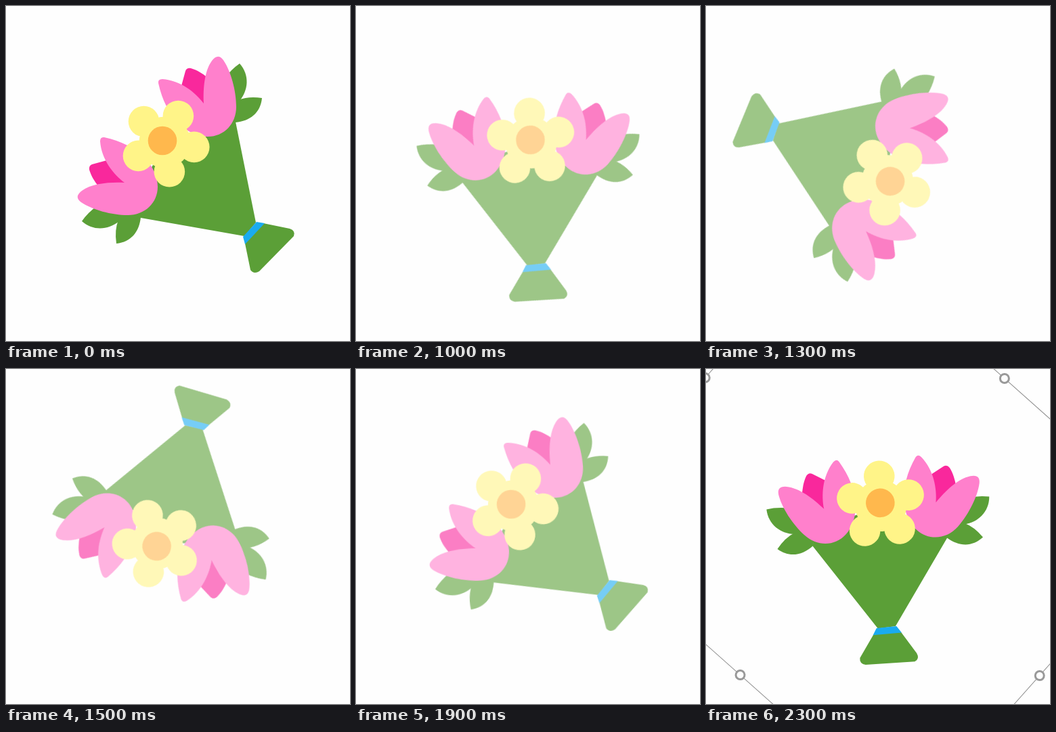
Recreate the animation shown at these times as an HTML page. Size 508 px wide and 495 px high, loop 2900 ms.

```html
<!DOCTYPE html>
<html lang="en">
<head>
<meta charset="utf-8">
<title>Rotating bouquet</title>
<style>
  html, body { margin: 0; width: 100%; height: 100%; overflow: hidden; background: #fefefe; }
  svg { display: block; width: 100%; height: 100%; }
</style>
</head>
<body>
<svg viewBox="0 0 508 495">
  <defs>
    <g id="leaves" fill="#5b9f37">
      <path d="M345 85C360 102 358 124 345 140L322 150L322 108Q332 94 345 85Z"/>
      <path d="M343 139Q358 133 378 136C376 158 360 170 339 172L318 158L322 140Z"/>
    </g>
    <g id="tulip">
      <path fill="#f9289c" d="M259 118L265 96Q267 91 273 92C283 95 290 100 297 105L293 147Z"/>
      <path fill="#ff80cc" d="M225 114Q224 108 231 108C258 110 280 128 292 144C291 122 293 96 304 81Q313 69 321 80C332 96 340 125 340 149C340 174 322 193 298 193C268 193 236 165 225 114Z"/>
    </g>
  </defs>
  <g id="bouquet">
    <use href="#leaves"/>
    <use href="#leaves" transform="matrix(0 1 1 0 27 -27)"/>
    <path fill="#5b9f37" d="M339 171L369 320L352 340L199 313L184 290L220 230L300 190L318 156Z"/>
    <path fill="#5b9f37" d="M380 321L419 329Q428 332 425 340L374 392Q366 397 361 390L353 351Z"/>
    <path fill="#1aabf0" d="M370 319L382 321L353 352L350 341Z"/>
    <use href="#tulip"/>
    <use href="#tulip" transform="matrix(0 1 1 0 31 -31)"/>
    <g id="petals" fill="#fff488">
      <circle cx="234.5" cy="201.5" r="38"/>
    </g>
    <circle cx="231" cy="199" r="21.3" fill="#ffb84d"/>
  </g>
  <g id="frame" fill="none" stroke="#8e8e8e"></g>
</svg>
<script>
const NS = 'http://www.w3.org/2000/svg';
const CENTER = [245.7, 233];
const HALF = [330.8, 293.4];
const LOOP = 2900, GRAB = 900, DROP = 2300, STEP = 100;
// Rotation in degrees for each 100 ms step of the drag
const ANGLES = [0, 42, 90, 125, 158, 200, 242, 272, 302, 330, 356.8, 375, 390, 400, 401.7];

const bouquet = document.getElementById('bouquet');
const petals = document.getElementById('petals');
const frame = document.getElementById('frame');

function add(parent, tag, attrs) {
  const el = document.createElementNS(NS, tag);
  for (const key in attrs) el.setAttribute(key, attrs[key]);
  parent.append(el);
}

for (let i = 0; i < 5; i++) {
  const a = (9 + 72 * i) * Math.PI / 180;
  add(petals, 'circle', { cx: 234.5 + 43.8 * Math.cos(a), cy: 201.5 + 43.8 * Math.sin(a), r: 22.8 });
}

const [cx, cy] = CENTER, [hw, hh] = HALF;
add(frame, 'rect', { x: cx - hw, y: cy - hh, width: 2 * hw, height: 2 * hh, 'stroke-width': 1 });
for (const [dx, dy] of [[0, -hh], [hw, 0], [0, hh], [-hw, 0]]) {
  add(frame, 'circle', { cx: cx + dx, cy: cy + dy, r: 6.5, fill: '#fefefe', stroke: '#999', 'stroke-width': 3 });
}

function render(time) {
  const t = time % LOOP;
  const step = Math.floor((t - GRAB) / STEP);
  const angle = ANGLES[Math.max(0, Math.min(ANGLES.length - 1, step))];
  const turn = `rotate(${angle} ${cx} ${cy})`;
  bouquet.setAttribute('transform', turn);
  bouquet.setAttribute('opacity', t >= GRAB && t < DROP ? 0.6 : 1);
  frame.setAttribute('transform', turn);
  frame.setAttribute('visibility', t >= DROP ? 'visible' : 'hidden');
}

const start = performance.now();
function tick() {
  render(performance.now() - start);
  requestAnimationFrame(tick);
}
tick();
</script>
</body>
</html>
```
